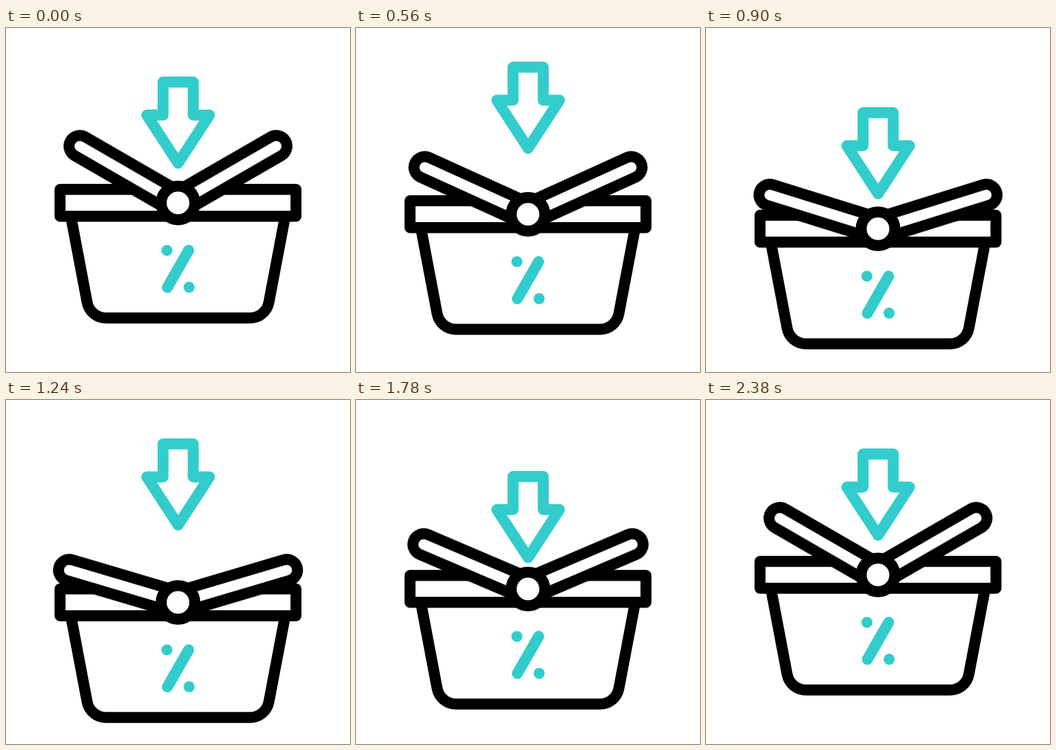
Animation, 640 px wide and 640 px high, one loop 2400 ms. Source, as an HTML page:

```html
<!DOCTYPE html>
<html lang="en">
<head>
<meta charset="utf-8">
<title>Basket</title>
<style>
  html, body { margin: 0; width: 100%; height: 100%; overflow: hidden; background: #fff; }
  svg { display: block; width: 100%; height: 100%; }
  .line { fill: none; stroke: #000; stroke-width: 20.4; stroke-linejoin: round; }
  .accent { stroke: #33cccc; stroke-linecap: round; }
  .dot { fill: #33cccc; stroke: none; }
  .solid { fill: #fff; }

  .basket, .handle { animation: dip 2400ms cubic-bezier(.68, 0, .32, 1) infinite; }
  .handle { animation-name: tilt; transform-origin: 0 0; }
  .arrow { animation: bob 2400ms cubic-bezier(.333, 0, .667, 1) infinite; }

  @keyframes dip {
    0%, 99.167%, 100% { transform: translateY(0); }
    49.583% { transform: translateY(51.2px); }
  }
  @keyframes tilt {
    0%, 99.167%, 100% { transform: rotate(30deg); }
    49.583% { transform: rotate(16.5deg); }
  }
  @keyframes bob {
    0% { transform: translateY(0); }
    18.125% { transform: translateY(-47px); }
    37.167% { transform: translateY(57px); }
    56.125% { transform: translateY(-31px); }
    74.792% { transform: translateY(42px); }
    93.333%, 100% { transform: translateY(0); }
  }
</style>
</head>
<body>
<svg viewBox="0 0 640 640" class="line">
  <defs>
    <path id="bar" class="solid" d="M0 -20H-211A20 20 0 0 0 -211 20H0"/>
  </defs>

  <path class="arrow accent" d="M292.2 100.5H348.3V162H378.6L320.2 251.5L262 162H292.2Z"/>

  <g class="basket">
    <path d="M121.3 354L151 510.6A35.6 35.6 0 0 0 186 539.5H454A35.6 35.6 0 0 0 489 510.6L518.7 354"/>
    <rect class="solid" x="100.5" y="300.3" width="439" height="50"/>
    <g transform="translate(320 325.4)">
      <g class="handle"><use href="#bar"/></g>
      <g transform="scale(-1 1)"><g class="handle"><use href="#bar"/></g></g>
      <circle class="solid" r="31.3"/>
    </g>
    <path class="accent" d="M339.8 413.6L300.2 482.6"/>
    <circle class="dot" cx="299.4" cy="413.7" r="10.3"/>
    <circle class="dot" cx="340.7" cy="482.4" r="10.3"/>
  </g>
</svg>
</body>
</html>
```
